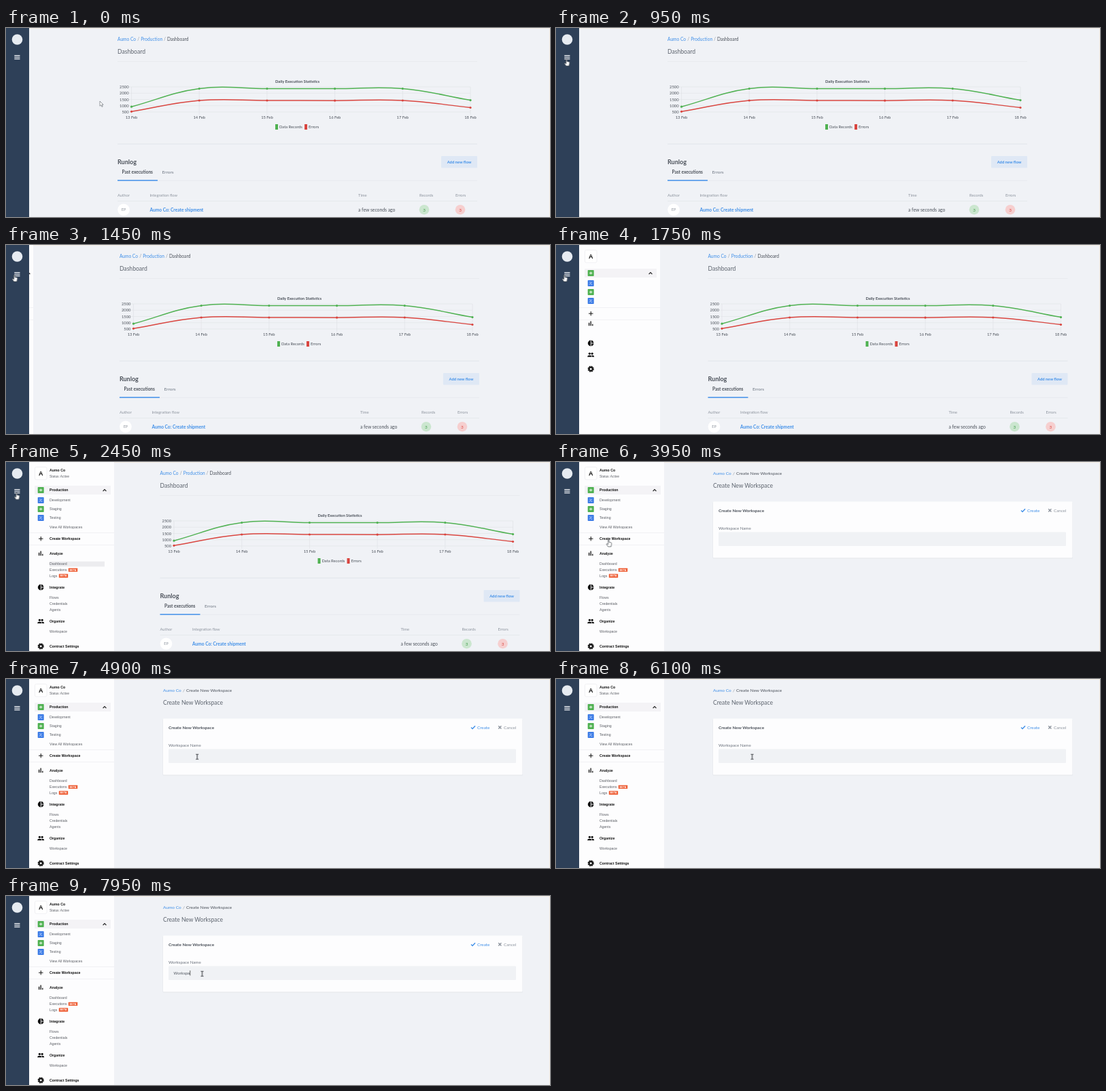
An HTML page that plays this animation: 800 by 279 pixels, repeating every 8000 ms.

```html
<!DOCTYPE html>
<html lang="en">
<head>
<meta charset="utf-8">
<title>Create a workspace</title>
<style>
  html, body { margin: 0; width: 100%; height: 100%; overflow: hidden; }
  #stage { position: relative; width: 800px; height: 279px; overflow: hidden; background: #f0f2f6; }
  svg { position: absolute; left: 0; top: 0; overflow: visible; }
  svg text { font-family: Lato, sans-serif; white-space: pre; }
  .ui text, text.ui { font-family: "Liberation Sans", Arial, sans-serif; }
  #panel { position: absolute; left: 34px; top: 0; width: 125px; height: 279px; overflow: hidden; background: #fdfdfe; }
  #panel svg { left: -34px; }
  #current { position: absolute; left: 8px; right: 5px; top: 35px; height: 13px; background: #f4f3f6; }
  #current svg { left: auto; right: 6px; top: 4px; }
  .edge { position: absolute; background: #f4ede4; }
</style>
</head>
<body>
<div id="stage">
  <svg id="dash" width="800" height="279"></svg>
  <svg id="form" width="800" height="279"></svg>
  <div class="edge" style="left:34px;top:0;width:766px;height:1px"></div>
  <div class="edge" style="left:799px;top:0;width:1px;height:279px"></div>
  <div id="panel">
    <div id="current">
      <svg width="6" height="5"><path d="M.6 4 3 1.6 5.4 4" fill="none" stroke="#222" stroke-width="1.1"/></svg>
    </div>
    <svg id="menu" class="ui" width="160" height="279"></svg>
  </div>
  <svg id="rail" width="34" height="279">
    <rect width="34" height="279" fill="#2e4058"/>
    <circle cx="16.5" cy="17" r="7.8" fill="#e6ebf1"/>
    <path d="M12.3 40.6h8.2M12.3 43.1h8.2M12.3 45.6h8.2" stroke="#f2f4f7" stroke-width="1.2"/>
  </svg>
  <svg id="pointer" width="1" height="1">
    <path id="arrow" d="M0 0V7.2L1.8 5.7 3 8.4 4.2 7.9 3 5.2H5.2Z" fill="#fff" stroke="#6b7078" stroke-width=".7"/>
    <path id="hand" d="M-.7 .5Q0-.4 .8 .5V3.4L3.6 4Q4.6 4.3 4.5 5.4L3.7 10H-.7L-3 6.6Q-3.2 5.6-2.2 5.7L-.7 6.7Z" fill="#fff" stroke="#3a3f47" stroke-width=".7"/>
    <path id="beam" d="M-1.9-3.6H-.6L0-3.2 .6-3.6H1.9M0-3.2V3.2M-1.9 3.6H-.6L0 3.2 .6 3.6H1.9" fill="none" stroke="#25282d" stroke-width="1"/>
  </svg>
</div>
<script>
const LOOP = 8000, ORG = 'Aumo Co';
const BLUE = '#3f8fe8', INK = '#4a5059', GREY = '#8d949e', GREEN = '#4fb151', RED = '#d9453f';
const $ = id => document.getElementById(id);

const text = (x, y, s, size, fill = INK, attrs = '') =>
  `<text x="${x}" y="${y}" font-size="${size}" fill="${fill}" ${attrs}>${s}</text>`;
const rect = (x, y, w, h, fill, attrs = '') =>
  `<rect x="${x}" y="${y}" width="${w}" height="${h}" fill="${fill}" ${attrs}/>`;
const line = (d, stroke, width = 1) => `<path d="${d}" fill="none" stroke="${stroke}" stroke-width="${width}"/>`;
const disc = (x, y, r, fill) => `<circle cx="${x}" cy="${y}" r="${r}" fill="${fill}"/>`;
const BOLD = 'font-weight="700"', MID = 'text-anchor="middle"', END = 'text-anchor="end"';

// Smooth line through points, with tension 0.4
function smooth(pts) {
  const dist = (a, b) => Math.hypot(a[0] - b[0], a[1] - b[1]);
  const ctrl = pts.map((p, i) => {
    const a = pts[i - 1] || p, b = pts[i + 1] || p;
    const da = dist(a, p), db = dist(p, b), k = .4 / (da + db);
    const dx = b[0] - a[0], dy = b[1] - a[1];
    return [[p[0] - k * da * dx, p[1] - k * da * dy], [p[0] + k * db * dx, p[1] + k * db * dy]];
  });
  return pts.map((p, i) => i ? `C${ctrl[i - 1][1]} ${ctrl[i][0]} ${p}` : `M${p}`).join('');
}

function chart() {
  const xs = [0, 1, 2, 3, 4, 5].map(i => 184.5 + i * 99.7);
  let s = text(428.5, 80.8, 'Daily Execution Statistics', 5.8, INK, BOLD + MID);
  for (let i = 0; i < 5; i++) {
    const y = 87 + i * 9.25;
    s += line(`M181 ${y}H683`, '#dfe2e6', .6) + text(180.5, y + 2, 2500 - i * 500, 5.8, INK, END);
  }
  xs.forEach((x, i) => {
    s += line(`M${x} 87V128`, '#dde0e4', .6) + text(x, 133.8, `${13 + i} Feb`, 5.8, INK, MID);
  });
  const series = [[GREEN, [116.2, 89.5, 89.5, 89.6, 89.5, 106.6]], [RED, [123.3, 107, 107, 107.2, 107, 117.5]]];
  for (const [color, ys] of series) {
    const pts = xs.map((x, i) => [x, ys[i]]);
    s += line(smooth(pts), color, 1.5) + pts.map(p => disc(...p, 1.6, color)).join('');
  }
  return s + rect(396, 142, 4, 8, GREEN) + text(402, 148, 'Data Records', 5.8)
    + rect(439, 142, 4, 8, RED) + text(445, 148, 'Errors', 5.8);
}

$('dash').innerHTML =
  text(164, 19.4, ORG, 6.6, BLUE) + text(193.3, 19.4, '/', 6.6, GREY) + text(198.2, 19.4, 'Production', 6.6, BLUE)
  + text(232, 19.4, '/', 6.6, GREY) + text(237, 19.4, 'Dashboard', 6.6) + text(164, 38, 'Dashboard', 8.6, '#5d646e')
  + line('M164 49.5H693', '#e6e9ed', .8) + chart() + line('M164 171.2H693', '#dfe2e7', .8)
  + text(164, 200.6, 'Runlog', 9, INK, BOLD)
  + rect(640, 189, 53, 17.6, '#dfe8f5', 'rx="1"') + text(666.5, 200, 'Add new flow', 5.8, BLUE, BOLD + MID)
  + text(170.5, 214.6, 'Past executions', 6.5, INK, BOLD) + text(229.5, 214.6, 'Errors', 6.4, GREY, BOLD)
  + line('M164 225.4H693', '#e5e8ec', .7) + line('M164 225H223', BLUE, 1.4)
  + [[164, 'Author'], [211.5, 'Integration flow'], [518, 'Time'], [608, 'Records'], [661, 'Errors']]
    .map(([x, s]) => text(x, 249, s, 5.8, GREY)).join('')
  + line('M164 255.5H693', '#e3e6ea', .8)
  + disc(173, 268.2, 8.8, '#fff') + text(173, 270.2, 'EP', 5.4, GREY, MID)
  + text(211.5, 270.6, ORG + ': Create shipment', 6.6, BLUE, BOLD) + text(518, 270.6, 'a few seconds ago', 6.8)
  + disc(615, 268.2, 7.3, '#cbe6cf') + text(615, 270.5, '3', 6.4, '#3f9c48', MID)
  + disc(668, 268.2, 7.3, '#f6cfcf') + text(668, 270.5, '3', 6.4, RED, MID);

$('form').innerHTML =
  text(231, 19.4, ORG, 6.5, BLUE) + text(260, 19.4, '/', 6.5, GREY) + text(265, 19.4, 'Create New Workspace', 6.5)
  + text(231, 38, 'Create New Workspace', 8.5, '#5d646e')
  + rect(230.5, 59, 529.5, 83.5, '#e3e6ea', 'rx="1.5"') + rect(231, 58.5, 528.5, 83, '#fdfdfe', 'rx="1"')
  + text(239, 74, 'Create New Workspace', 6.4, INK, BOLD)
  + line('M684 71.4 686 73.4 690 69.2', BLUE, 1.4) + text(693, 73.7, 'Create', 6.3, BLUE)
  + line('M724.2 69.2 728.4 73.4M728.4 69.2 724.2 73.4', GREY, 1.4) + text(732, 73.7, 'Cancel', 6.2, GREY)
  + text(239, 99.9, 'Workspace Name', 6.15, '#6a717b') + rect(239, 103.5, 511, 20.5, '#f0f2f5', 'rx="1"')
  + `<text id="typed" class="ui" x="246.5" y="116" font-size="6.1" fill="#555b64">${
    [...'Workspa'].map(c => `<tspan>${c}</tspan>`).join('')}</text>`
  + `<rect id="caret" x="246.5" y="110" width=".7" height="7.4" fill="#222"/>`;

// Menu: icon groups close up while the labels are hidden
const PLAIN = '#5c5f66', DARK = '#111';
const star = 'M51 39.2V43.8M48.7 41.5H53.3M49.4 39.9 52.6 43.1M52.6 39.9 49.4 43.1';
const spaceIcon = (y, live) => rect(46.7, y - 4.5, 9, 9, live ? GREEN : '#3c7ce6', 'rx=".8"')
  + (live ? `<g transform="translate(.2 ${y - 41.5})">${line(star, '#e9f7e9', .7)}</g>`
    : line(`M49.2 ${y + 2}L52.8 ${y - 2}M49.3 ${y - 1.6}h1.4M51.6 ${y + 1.7}h1.6`, '#e8f0ff', .9));
const icons = [
  [12, line('M34 104.5H159M34 122.5H159', '#eeeef1', .8) + line('M51.3 110V116.4M48.1 113.2H54.5', DARK, 1)],
  [19, line('M48.6 133.8V138.2M51.2 131.6V138.2M53.8 135.8V138.2', DARK, 1.3)],
  [40, disc(51.2, 185, 4.4, DARK) + line('M51.4 180V190M51.4 185H56', '#fdfdfe', .9)],
  [73, disc(49.4, 233.3, 1.6, DARK) + disc(53.2, 233.3, 1.6, DARK)
    + `<path d="M46.2 238.2Q46.4 235.8 49.4 235.8T52.4 238.2ZM53 238.2Q53 236.6 52.2 235.9 56 235.6 56.2 238.2Z" fill="${DARK}"/>`],
  [89, `<circle cx="51.2" cy="272" r="3.9" fill="none" stroke="${DARK}" stroke-width="1.4" stroke-dasharray="2 1.06"/>`
    + `<circle cx="51.2" cy="272" r="2.5" fill="none" stroke="${DARK}" stroke-width="1.9"/>`]
];
const heads = [[12.5, ORG], [41.3, 'Production'], [113.2, 'Create Workspace'], [135.2, 'Analyze'],
  [185, 'Integrate'], [235, 'Organize'], [272, 'Contract Settings']];
const items = [[56.5, 'Development'], [69.5, 'Staging'], [82.5, 'Testing'], [95.6, 'View All Workspaces'],
  [150.5, 'Dashboard'], [159.4, 'Executions'], [168, 'Logs'], [200.3, 'Flows'], [209, 'Credentials'],
  [217.7, 'Agents'], [250.3, 'Workspace']];
const badge = (x, y) => rect(x, y - 2.7, 13.4, 5.4, '#ee5a30', 'rx=".5"')
  + text(x + 6.7, y + 1.3, 'BETA', 3.7, '#fff', BOLD + MID);

$('menu').innerHTML =
  rect(42.5, 7.5, 17.5, 18.5, '#fff', 'rx="2" stroke="#ececf0" stroke-width=".8"')
  + text(51.2, 20, 'A', 9, DARK, BOLD + MID)
  + spaceIcon(41.5, 1) + spaceIcon(56.5, 0) + spaceIcon(69.5, 1) + spaceIcon(82.5, 0)
  + icons.map(([, s]) => `<g class="icon">${s}</g>`).join('')
  + '<g id="labels">' + rect(64, 146.8, 81, 7.6, '#ececef', 'id="active"')
  + heads.map(([y, s]) => text(64, y + 1.9, s, 5.23, DARK, BOLD)).join('')
  + items.map(([y, s]) => text(64, y + 1.9, s, 5.23, PLAIN)).join('')
  + text(64, 22.8, 'Status: Active', 4.75, PLAIN) + badge(91.8, 159.4) + badge(77.8, 168) + '</g>';

// Rows: [time, value, easing to the next row]; a row without easing holds
function play(el, prop, rows) {
  el.animate(rows.map(([t, v, easing = 'step-end']) => ({ offset: t / LOOP, [prop]: v, easing })),
    { duration: LOOP, iterations: Infinity });
}
const at = (x, y) => `translate(${x}px, ${y}px)`;
const SLIDE = 'cubic-bezier(.4, 0, .2, 1)', MOVE = 'ease-in-out';
const OPEN = 1386, OPENED = 1886, PAGE = 3450;

play($('panel'), 'width', [[0, '0px'], [OPEN, '0px', SLIDE], [OPENED, '125px'], [LOOP, '125px']]);
play($('dash'), 'transform', [[0, at(0, 0)], [OPEN, at(0, 0), SLIDE], [OPENED, at(62.5, 0)], [LOOP, at(62.5, 0)]]);
play($('dash'), 'opacity', [[0, 1], [PAGE, 0], [LOOP, 0]]);
play($('form'), 'opacity', [[0, 0], [PAGE, 1], [LOOP, 1]]);
play($('active'), 'opacity', [[0, 1], [PAGE, 0], [LOOP, 0]]);
play($('labels'), 'opacity', [[0, 0], [1900, 1], [LOOP, 1]]);
document.querySelectorAll('.icon').forEach((el, i) =>
  play(el, 'transform', [[0, at(0, -icons[i][0])], [1900, at(0, 0)], [LOOP, at(0, 0)]]));

play($('pointer'), 'transform', [
  [0, at(138, 108)], [50, at(138, 108), MOVE], [850, at(15.5, 46)], [1000, at(12.3, 45.5)],
  [1200, at(12.3, 44)], [2450, at(15.4, 45.3), MOVE], [3250, at(77.3, 115)],
  [4250, at(77.3, 115), MOVE], [5000, at(288.5, 114.8)], [LOOP, at(288.5, 114.8)]]);
play($('arrow'), 'opacity', [[0, 1], [750, 0], [2650, 1], [2900, 0], [4450, 1], [4760, 0], [LOOP, 0]]);
play($('hand'), 'opacity', [[0, 0], [750, 1], [2650, 0], [2900, 1], [4450, 0], [LOOP, 0]]);
play($('beam'), 'opacity', [[0, 0], [4760, 1], [LOOP, 1]]);

const keys = [6400, 6700, 6950, 7200, 7450, 7700, 7900];
const widths = keys.map((_, i) => $('typed').getSubStringLength(0, i + 1));
[...$('typed').children].forEach((el, i) => play(el, 'fillOpacity', [[0, 0], [keys[i], 1], [LOOP, 1]]));
play($('caret'), 'transform', [[0, at(0, 0)], ...keys.map((t, i) => [t, at(widths[i], 0)]), [LOOP, at(widths[6], 0)]]);
play($('caret'), 'opacity', [[0, 0], [5150, 1], [5650, 0], [6150, 1], [LOOP, 1]]);
</script>
</body>
</html>
```
